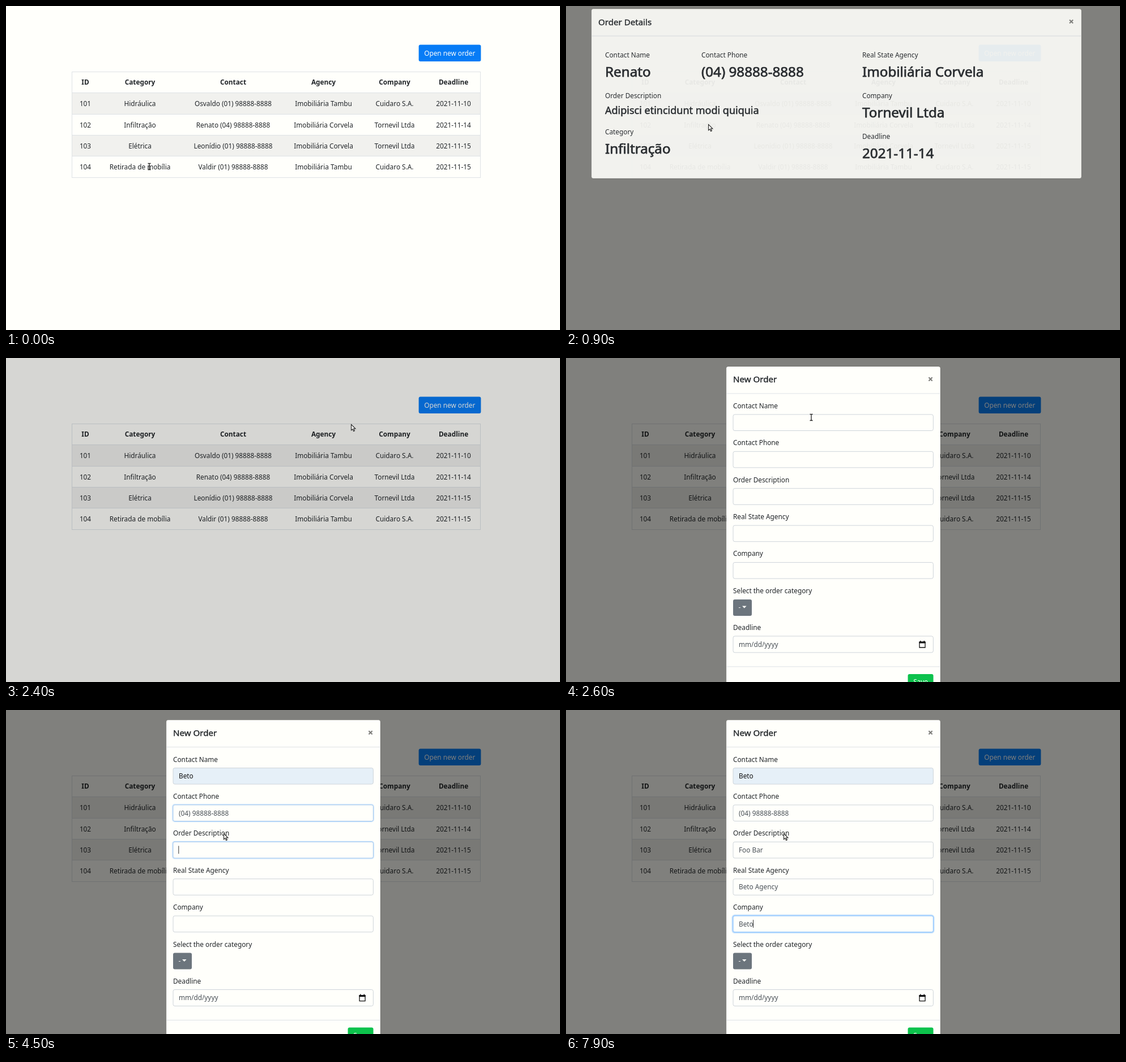
Recreate the animation shown at these times as an HTML page. Size 978 px wide and 573 px high, loop 8 s.

```html
<!DOCTYPE html>
<html lang="en">
<head>
<meta charset="utf-8">
<title>Service orders</title>
<style>
  html, body { margin: 0; width: 100%; height: 100%; overflow: hidden; background: #fffffb; }
  svg { display: block; width: 978px; height: 573px; }
  text { font: 400 11.8px "Noto Sans", "Open Sans", sans-serif; fill: #212529; }
  .mid { text-anchor: middle; }
  .head { font-weight: 700; }
  /* a thin outline gives the medium weight */
  .title, .big, .medium { stroke: #212529; stroke-linejoin: round; }
  .title { font-size: 15.1px; stroke-width: .4px; }
  .big { font-size: 24.2px; stroke-width: .75px; }
  .medium { font-size: 18px; stroke-width: .5px; }
  .light { fill: #fffffb; }
  .value { fill: #495057; }
  .line { stroke: #dee2e6; fill: none; }
  .panel { fill: #fffffb; stroke: rgba(0, 0, 0, .2); }
  .close { stroke: #7f7f7c; stroke-width: 2.1; }
  .box { fill: #fffffb; stroke: #ced4da; }
  .ring { fill: none; stroke: #007bff; stroke-opacity: .25; }
</style>
</head>
<body>
<svg id="stage" viewBox="0 0 978 573" xmlns="http://www.w3.org/2000/svg"></svg>
<script>
const LOOP = 8000, STEP = 100;

const text = (x, y, str, cls = '') => `<text x="${x}" y="${y}" class="${cls}">${str}</text>`;
const rect = (x, y, w, h, attrs) => `<rect x="${x}" y="${y}" width="${w}" height="${h}" ${attrs}/>`;
const path = (d, attrs) => `<path d="${d}" ${attrs}/>`;
const closeMark = x => path(`M${x - 3.1} 36.9l6.2 6.2m0-6.2l-6.2 6.2`, 'class="close"');

const columns = [140, 236.5, 401, 560.5, 686, 790];
const headers = ['ID', 'Category', 'Contact', 'Agency', 'Company', 'Deadline'];
const phones = ['(01) 98888-8888', '(04) 98888-8888'];
const agencies = ['Imobiliária Tambu', 'Imobiliária Corvela'];
const companies = ['Cuidaro S.A.', 'Tornevil Ltda'];
const rows = [
  ['101', 'Hidráulica', 'Osvaldo ' + phones[0], agencies[0], companies[0], '2021-11-10'],
  ['102', 'Infiltração', 'Renato ' + phones[1], agencies[1], companies[1], '2021-11-14'],
  ['103', 'Elétrica', 'Leonídio ' + phones[0], agencies[1], companies[1], '2021-11-15'],
  ['104', 'Retirada de mobília', 'Valdir ' + phones[0], agencies[0], companies[0], '2021-11-15']
];

function page() {
  const rowText = (cells, y, cls) => cells.map((c, i) => text(columns[i], y, c, cls)).join('');
  const stripes = [154, 229].map(y => rect(117, y, 721, 37, 'fill="#f1f1ee"')).join('');
  const lines = [153.5, 191.5, 228.5, 265.5].map(y => `M116.5 ${y}H837.5`).join('');
  return rect(0, 0, 978, 573, 'fill="#fffffb"')
    + rect(728.6, 68.6, 109.8, 29.4, 'rx="3" fill="#077cf6"')
    + text(783.3, 87.6, 'Open new order', 'mid light')
    + stripes + path(lines, 'class="line"')
    + rect(116.5, 116.5, 721, 187, 'class="line"')
    + rowText(headers, 139.3, 'mid head')
    + rows.map((r, i) => rowText(r, 177.2 + i * 37.3, 'mid')).join('');
}

function details() {
  const [, category, , agency, company, deadline] = rows[1];
  const items = [
    [69, 103.5, 'Contact Name', 'Renato'],
    [239, 103.5, 'Contact Phone', phones[1]],
    [69, 239.8, 'Category', category],
    [523, 103.5, 'Real State Agency', agency],
    [523, 175.2, 'Company', company],
    [523, 247, 'Deadline', deadline]
  ];
  return rect(44.8, 17.5, 865.2, 300, 'rx="3.5" class="panel"')
    + text(57, 46, 'Order Details', 'title') + closeMark(892)
    + path('M45.5 65.5H909.5', 'class="line"')
    + items.map(([x, y, label, value]) => text(x, y, label) + text(x, y + 34, value, 'big')).join('')
    + text(69, 175.2, 'Order Description')
    + text(69, 203.8, 'Adipisci etincidunt modi quiquia', 'medium');
}

// keys: [time, number of characters typed]
const fields = [
  { label: 'Contact Name', value: 'Beto', from: 2800, to: 3500, keys: [[3000, 1], [3100, 2], [3200, 4]] },
  { label: 'Contact Phone', value: phones[1], from: 3500, to: 4500,
    keys: [[3600, 1], [3800, 7], [4000, 9], [4300, 13], [4400, 15]] },
  { label: 'Order Description', value: 'Foo Bar', from: 4500, to: 5800,
    keys: [[5100, 1], [5200, 2], [5300, 3], [5600, 5], [5700, 7]] },
  { label: 'Real State Agency', value: 'Beto Agency', from: 5800, to: 7600,
    keys: [[6600, 1], [6700, 2], [6800, 3], [6900, 4], [7100, 6], [7200, 7], [7300, 8], [7400, 10], [7500, 11]] },
  { label: 'Company', value: 'Beto', from: 7600, to: 9000, keys: [[7700, 1], [7800, 3], [7900, 4]] }
];
const fieldTop = i => 102.5 + i * 65.4;

function form() {
  const inputs = fields.map((f, i) => {
    const y = fieldTop(i);
    return text(295, y - 11, f.label)
      + rect(293.8, y - 1, 355.4, 30.6, 'rx="4" class="ring"')
      + rect(295, y, 353.3, 28.6, 'rx="3" class="box"')
      + text(305, y + 18.7, '', 'value');
  }).join('');
  return rect(282.8, 17.5, 378.2, 600, 'rx="3.5" class="panel"')
    + text(295, 46, 'New Order', 'title') + closeMark(643.5)
    + path('M283.5 65.5H660.5M283.5 548.5H660.5', 'class="line"')
    + inputs
    + text(295, 418.5, 'Select the order category')
    + rect(295, 429.5, 33, 29, 'rx="3" fill="#6c757d"')
    + text(304.5, 447.5, '-', 'light')
    + path('M311 441h7.6l-3.8 4z', 'fill="#fffffb"')
    + text(295, 484, 'Deadline')
    + rect(295, 494.5, 353.3, 29, 'rx="3" class="box"')
    + text(305, 513.3, 'mm/dd/yyyy', 'value')
    + path('M624 505h10v9.6h-10z', 'fill="none" stroke="#111" stroke-width="1.3"')
    + path('M623.4 504h11.2v3.2h-11.2zM625 502.5h1.5v2H625zM631.5 502.5h1.5v2h-1.5z', 'fill="#111"')
    + rect(603.5, 561.5, 45, 29, 'rx="3" fill="#0dc24c"')
    + text(626, 580, 'Save', 'mid light')
    + rect(0, 0, 1, 14, 'id="caret" fill="#333"');
}

const stage = document.getElementById('stage');
stage.innerHTML = page()
  + rect(0, 0, 978, 573, 'id="shade" fill="#030300"')
  + `<g id="details">${details()}</g><g id="form">${form()}</g>`
  + path('M0 0V10.3L2.4 8.2 4.1 12 5.9 11.2 4.2 7.5H7.4Z', 'id="arrow" fill="#fffffb" stroke="#222" stroke-width="1.1"')
  + path('M-2.5-5.5H-.8L0-5 .8-5.5H2.5M0-5V5M-2.5 5.5H-.8L0 5 .8 5.5H2.5', 'id="beam" fill="none" stroke="#222" stroke-width="1.3"');

const get = id => document.getElementById(id);
const [shade, detailBox, formBox, arrow, beam, caret] =
  ['shade', 'details', 'form', 'arrow', 'beam', 'caret'].map(get);
const rings = formBox.querySelectorAll('.ring');
const boxes = formBox.querySelectorAll('.box');
const values = formBox.querySelectorAll('.value');

const clamp = v => Math.max(0, Math.min(1, v));
const smooth = v => v * v * (3 - 2 * v);
const mix = (a, b, p) => a + (b - a) * p;

// Value of a [time, value] track at time t
function track(keys, t, ease = p => p) {
  const i = keys.findIndex(k => k[0] > t);
  if (i < 0) return keys[keys.length - 1][1];
  if (i === 0) return keys[0][1];
  const [a, b] = [keys[i - 1], keys[i]];
  return mix(a[1], b[1], ease((t - a[0]) / (b[0] - a[0])));
}

const shadeKeys = [[700, 0], [800, .28], [900, .5], [2000, .5], [2100, .3], [2200, 0], [2300, 0], [2400, .16], [2500, .48], [2600, .5]];
const detailFade = [[800, 0], [900, .9], [1000, 1], [1900, 1], [2000, .35], [2100, 0]];
const detailShift = [[900, -12.5], [1000, -.6], [1100, 0], [1900, 0], [2000, -15]];
const formFade = [[2400, 0], [2500, .8], [2600, 1]];
const formShift = [[2500, -15], [2600, -2.6], [2700, 0]];
const pointer = [
  [0, 253, 284], [600, 251.5, 209.5], [1000, 251.5, 209.5], [1800, 703.5, 371.5], [2000, 703.5, 371.5],
  [2300, 775, 92], [2400, 609.5, 117.5], [2500, 505, 108], [2600, 433, 105], [2800, 431, 112], [3400, 384.5, 218.5]
];
const pointerX = pointer.map(([t, x]) => [t, x]);
const pointerY = pointer.map(([t, , y]) => [t, y]);

function place(el, opacity, dy) {
  el.setAttribute('opacity', opacity);
  el.setAttribute('transform', `translate(0 ${dy})`);
}

function drawFields(t) {
  let caretOn = false;
  fields.forEach((f, i) => {
    const typed = f.keys.filter(k => k[0] <= t).pop() || [f.from, 0];
    const focus = clamp((t - f.from + 60) / 120) * (1 - clamp((t - f.to + 60) / 120));
    values[i].textContent = f.value.slice(0, typed[1]);
    rings[i].setAttribute('stroke-width', 2.5 * focus);
    boxes[i].style.stroke = `rgb(${mix(206, 128, focus)}, ${mix(212, 189, focus)}, ${mix(218, 255, focus)})`;
    if (i === 0) {
      const filled = t >= 3300;
      boxes[i].style.fill = filled ? '#e6f0f8' : '#fffffb';
      values[i].style.fill = filled ? '#111' : '#495057';
    }
    if (t >= f.from && t < f.to) {
      caretOn = Math.floor((t - typed[0]) / 300) % 2 === 0;
      const width = typed[1] ? values[i].getComputedTextLength() : 0;
      caret.setAttribute('x', 304.3 + width);
      caret.setAttribute('y', fieldTop(i) + 7);
    }
  });
  caret.setAttribute('opacity', caretOn ? 1 : 0);
}

function draw(t) {
  shade.setAttribute('opacity', track(shadeKeys, t));
  place(detailBox, track(detailFade, t), track(detailShift, t));
  place(formBox, track(formFade, t), track(formShift, t));
  drawFields(t);

  const isBeam = t < 700 || (t >= 2600 && t < 3000);
  const at = `translate(${track(pointerX, t, smooth)} ${track(pointerY, t, smooth)})`;
  [[beam, isBeam], [arrow, !isBeam]].forEach(([el, on]) => {
    el.setAttribute('transform', at);
    el.setAttribute('opacity', on ? 1 : 0);
  });
}

const start = performance.now();
function tick() {
  const t = (performance.now() - start) % LOOP;
  draw(Math.floor(t / STEP) * STEP);
  requestAnimationFrame(tick);
}
tick();
</script>
</body>
</html>
```
